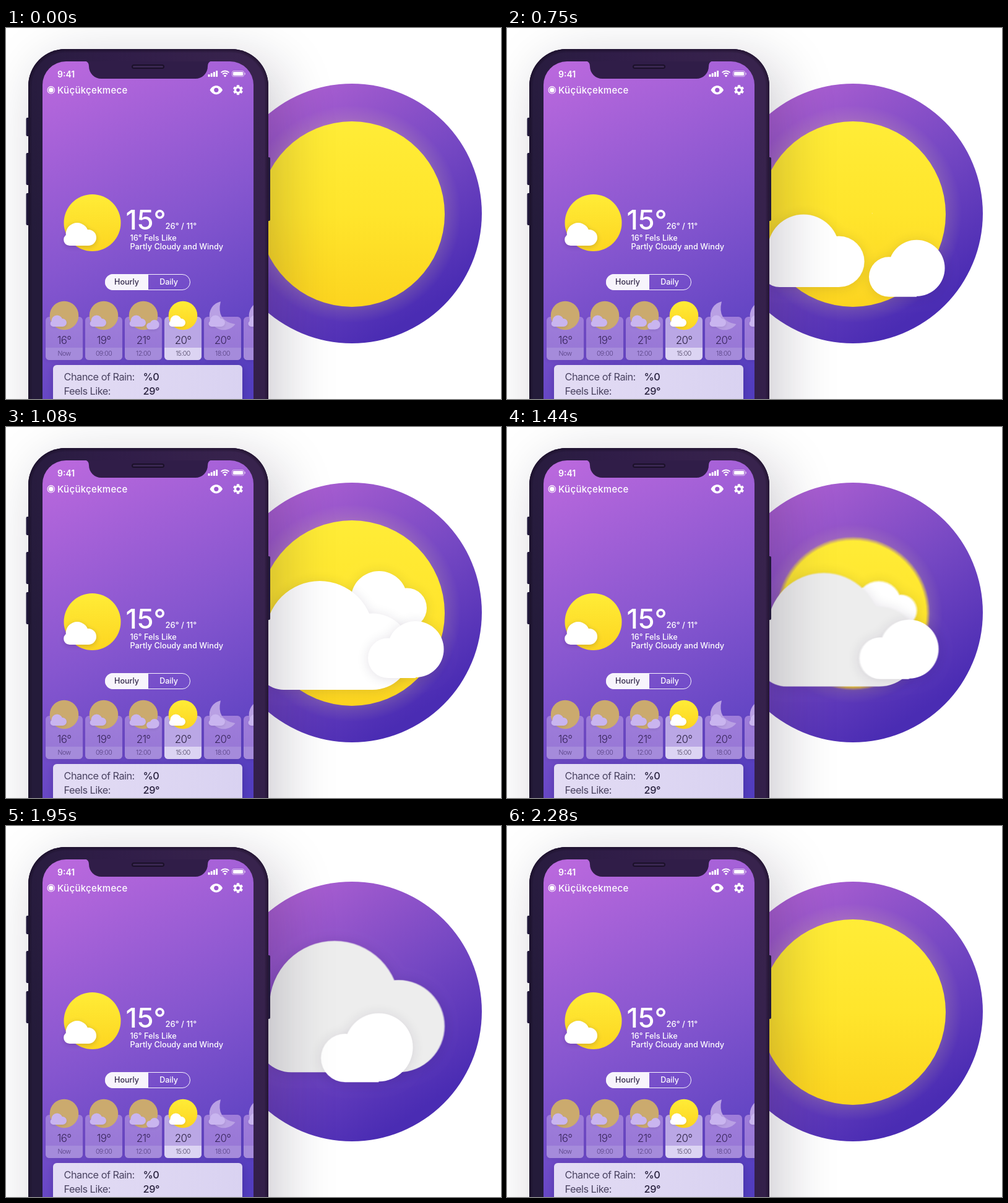
Write an HTML page with a canvas that moves like this. It is 800x600 px and loops after 2.4 s.

```html
<!DOCTYPE html>
<html lang="en">
<head>
<meta charset="utf-8">
<title>Weather transition</title>
<style>
html, body { margin: 0; width: 100%; height: 100%; overflow: hidden; background: #fff; }
canvas { display: block; }
</style>
</head>
<body>
<canvas id="stage" width="800" height="600"></canvas>
<script>
const W = 800, H = 600, LOOP = 2400, STEP = 30, TAU = Math.PI * 2;
const stage = document.getElementById('stage').getContext('2d');
const layer = newLayer(), phone = newLayer();

function newLayer() {
  const c = document.createElement('canvas');
  c.width = W;
  c.height = H;
  return c.getContext('2d');
}

function gradient(c, x0, y0, x1, y1, ...colors) {
  const g = c.createLinearGradient(x0, y0, x1, y1);
  colors.forEach((col, i) => g.addColorStop(i / (colors.length - 1), col));
  return g;
}

function disc(c, x, y, r, fill) {
  c.beginPath();
  c.arc(x, y, r, 0, TAU);
  c.fillStyle = fill;
  c.fill();
}

function box(c, x, y, w, h, r, fill) {
  c.beginPath();
  c.roundRect(x, y, w, h, r);
  c.fillStyle = fill;
  c.fill();
}

function shadow(c, color, blur, dx, dy) {
  c.shadowColor = color;
  c.shadowBlur = blur;
  c.shadowOffsetX = dx;
  c.shadowOffsetY = dy;
}

// x, y: top of the main lobe; h: height; side: 1 puts the small lobe right
function cloud(c, x, y, h, fill, { side = 1, tail = true, shade = 0.12, blur = 20 } = {}) {
  if (h < 0.5) return;
  const lobe = (cx, cy, r) => {
    c.moveTo(cx + r, cy);
    c.arc(cx, cy, r, 0, TAU);
  };
  c.save();
  c.translate(x, y);
  c.scale(h * side, h);
  c.beginPath();
  lobe(0, 0.495, 0.495);
  lobe(0.486, 0.649, 0.351);
  if (tail) lobe(-0.33, 0.74, 0.26);
  const left = tail ? -0.33 : 0;
  c.rect(left, 0.7, 0.486 - left, 0.3);
  shadow(c, `rgba(30,10,60,${shade})`, blur, 0, 2);
  c.fillStyle = fill;
  c.fill();
  c.restore();
}

// ---- animated badge ----

// clouds: [x, top, height], sun: [x, y, radius]
const SUN = [559, 301, 150];
const clear = { sun: SUN, big: [424, 376.5, 0], front: [632, 402, 0], back: [590, 300, 0] };
const partly = { sun: SUN, big: [479, 302, 117], front: [662, 343, 92], back: [590, 300, 0] };
const mostly = { sun: SUN, big: [507, 249, 176], front: [662, 314, 92], back: [603, 233, 92] };
const overcast = { sun: [562, 304, 6], big: [532, 184, 214.5], front: [602, 301.5, 113], back: [592, 314, 0] };

const moves = [
  { at: 300, dur: 180, from: clear, to: partly },
  { at: 720, dur: 360, from: partly, to: mostly },
  { at: 1320, dur: 360, from: mostly, to: overcast },
  { at: 1920, dur: 360, from: overcast, to: clear }
];

const clamp = v => Math.max(0, Math.min(1, v));
const ease = p => p < 0.5 ? 2 * p * p : 1 - 2 * (1 - p) * (1 - p);
const mix = (a, b, e) => a.map((v, i) => v + (b[i] - v) * e);

function pose(t) {
  const m = moves.filter(v => v.at <= t).pop() || moves[0];
  const e = ease(clamp((t - m.at) / m.dur));
  const fast = m.to === clear ? Math.min(1, e / 0.75) : e;
  let grey = 0;
  if (m.to === overcast) grey = Math.min(1, e * 5);
  if (m.from === overcast) grey = 1;
  return {
    sun: mix(m.from.sun, m.to.sun, e),
    big: mix(m.from.big, m.to.big, e),
    front: mix(m.from.front, m.to.front, fast),
    back: mix(m.from.back, m.to.back, e),
    tone: Math.round(255 - 18 * grey)
  };
}

function drawBadge(c, t) {
  const { sun: [x, y, r], big, front, back, tone } = pose(t);
  c.fillStyle = '#fff';
  c.fillRect(0, 0, W, H);
  c.save();
  disc(c, 559, 300, 210, gradient(c, 455, 125, 675, 455, '#a75dd0', '#7648c3', '#4a2cb3'));
  c.clip();

  const glow = c.createRadialGradient(x, y, r * 0.9, x, y, r + 26);
  glow.addColorStop(0, 'rgba(255,235,120,.26)');
  glow.addColorStop(0.5, 'rgba(255,235,140,.1)');
  glow.addColorStop(1, 'rgba(255,235,150,0)');
  disc(c, x, y, r + 26, glow);
  disc(c, x, y, r, gradient(c, 0, y - r, 0, y + r, '#ffec37', '#ffe52c', '#fcd41f'));

  cloud(c, ...back, '#fff', { tail: false });
  cloud(c, ...big, `rgb(${tone},${tone},${tone})`);
  cloud(c, ...front, '#fff', { side: -1, tail: false });
  c.restore();
}

// ---- phone ----

function text(c, str, x, y, size, weight, fill, { align = 'left', gap = 0 } = {}) {
  c.font = `${weight} ${size}px Inter, "Open Sans", sans-serif`;
  c.letterSpacing = gap + 'px';
  c.textAlign = align;
  c.fillStyle = fill;
  c.fillText(str, x, y);
}

function drawBody(c) {
  c.save();
  shadow(c, 'rgba(25,15,40,.22)', 90, 18, 22);
  box(c, 36, 34, 388, 700, 60, '#2a1b40');
  c.restore();
  for (const [x, y, h] of [[32.5, 145, 30], [32.5, 202, 52], [32.5, 267, 52], [421, 209, 103]])
    box(c, x, y, 6, h, 2, '#21183a');
  box(c, 36, 34, 388, 700, 60, gradient(c, 36, 300, 424, 200, '#241b3a', '#301d48', '#38234d'));
  // soft dark rim
  c.save();
  c.clip();
  c.strokeStyle = 'rgba(20,13,34,.2)';
  for (const w of [3, 7, 11]) {
    c.lineWidth = w;
    c.beginPath();
    c.roundRect(36, 34, 388, 700, 60);
    c.stroke();
  }
  c.restore();
}

function drawStatus(c) {
  c.beginPath();
  c.moveTo(126, 53);
  c.quadraticCurveTo(134, 54, 134, 62);
  c.arcTo(134, 82, 154, 82, 20);
  c.arcTo(326, 82, 326, 62, 20);
  c.lineTo(326, 62);
  c.quadraticCurveTo(326, 54, 334, 53);
  c.fillStyle = '#301d48';
  c.fill();
  box(c, 203, 59, 53, 7, 3.5, '#1b1029');
  box(c, 205, 61, 49, 3, 1.5, '#3a2751');

  text(c, '9:41', 83, 79.5, 14, 600, '#fff');
  for (let i = 0; i < 4; i++) {
    const h = 4 + i * 2;
    box(c, 326.5 + i * 4.2, 79 - h, 3, h, 0.8, '#fff');
  }
  c.strokeStyle = '#fff';
  c.lineWidth = 2;
  for (const r of [5.4, 9]) {
    c.beginPath();
    c.arc(354, 78.5, r, -Math.PI * 0.75, -Math.PI * 0.25);
    c.stroke();
  }
  c.beginPath();
  c.moveTo(354, 79.5);
  c.arc(354, 79.5, 3.4, -Math.PI * 0.75, -Math.PI * 0.25);
  c.fillStyle = '#fff';
  c.fill();
  c.lineWidth = 1;
  c.strokeStyle = 'rgba(255,255,255,.6)';
  c.beginPath();
  c.roundRect(365.5, 69.5, 19, 9, 2.5);
  c.stroke();
  box(c, 367, 71, 16, 6, 1.3, '#fff');
  box(c, 385.6, 72.3, 1.4, 3.5, 0.7, 'rgba(255,255,255,.6)');
}

function drawHeader(c) {
  disc(c, 72.8, 100.3, 3.9, '#fff');
  c.lineWidth = 1.1;
  c.strokeStyle = '#fff';
  c.beginPath();
  c.arc(72.8, 100.3, 5.7, 0, TAU);
  c.stroke();
  text(c, 'Küçükçekmece', 83, 106, 15, 500, '#fff', { gap: 0.3 });

  c.beginPath();
  c.moveTo(329.5, 100.3);
  c.bezierCurveTo(334, 90.8, 345.5, 90.8, 350, 100.3);
  c.bezierCurveTo(345.5, 109.8, 334, 109.8, 329.5, 100.3);
  c.fillStyle = '#fff';
  c.fill();
  disc(c, 339.8, 100.3, 3.6, '#9b56cf');

  c.save();
  c.translate(375, 100.3);
  for (let i = 0; i < 6; i++) {
    box(c, -2.2, -8, 4.4, 6, 1, '#fff');
    c.rotate(TAU / 6);
  }
  disc(c, 0, 0, 6, '#fff');
  disc(c, 0, 0, 2.8, '#9052cb');
  c.restore();
}

function drawNow(c) {
  disc(c, 139.5, 315, 46, gradient(c, 0, 269, 0, 361, '#ffec37', '#fdd520'));
  cloud(c, 115, 315, 37, '#fff', { shade: 0.2, blur: 8 });
  text(c, '15°', 193.5, 326, 44, 500, '#fff', { gap: 0.2 });
  text(c, '26° / 11°', 257.5, 325, 13, 500, '#fff');
  text(c, '16° Fels Like', 200.5, 344, 12.75, 500, '#fff');
  text(c, 'Partly Cloudy and Windy', 200.5, 358, 12.75, 500, '#fff');

  box(c, 160, 398, 70, 26, [13, 0, 0, 13], '#f7f4fc');
  c.lineWidth = 1;
  c.strokeStyle = '#f7f4fc';
  c.beginPath();
  c.roundRect(160.5, 398.5, 137, 25, 12.5);
  c.stroke();
  text(c, 'Hourly', 195, 415, 12.5, 500, '#33294a', { align: 'center' });
  text(c, 'Daily', 263, 415, 12.5, 500, '#fff', { align: 'center' });
}

function moon(c, x) {
  c.beginPath();
  c.moveTo(x - 3, 442);
  c.arc(x + 2, 465, 23.3, -1.78, 0.65, true);
  c.quadraticCurveTo(x - 11, 474, x - 3, 442);
  c.fillStyle = '#b9a0e4';
  c.fill();
}

function drawHours(c) {
  const hours = [['16°', 'Now'], ['19°', '09:00'], ['21°', '12:00'], ['20°', '15:00'], ['20°', '18:00'], ['', '']];
  hours.forEach(([temp, label], i) => {
    const x = 64 + i * 64, mid = x + 30, active = i === 3;
    c.save();
    shadow(c, 'rgba(40,15,90,.12)', 6, 0, 2);
    box(c, x, 467, 60, 70, 6, active ? '#baa7e5' : gradient(c, 0, 467, 0, 537, '#9f7dda', '#9676d5'));
    c.restore();
    box(c, x, 517, 60, 20, [0, 0, 6, 6], active ? '#dcd4f3' : '#a58bdb');
    if (i < 4) {
      const sun = active ? gradient(c, 0, 442, 0, 488, '#ffec37', '#fdd520') : '#cbaa6e';
      disc(c, mid, 465, 23.3, sun);
    } else {
      moon(c, mid);
    }
    const tint = active ? '#fff' : '#c9b5ef';
    cloud(c, mid - 11.5, 464.5, 18.5, tint, { shade: 0.1, blur: 4 });
    if (i === 2) cloud(c, mid + 18, 472, 15.5, tint, { side: -1, tail: false, shade: 0.1, blur: 4 });
    const ink = active ? '#2b2142' : '#37245a';
    text(c, temp, mid, 511, 17, 300, ink, { align: 'center', gap: -0.8 });
    text(c, label, mid, 530, 10.5, 300, active ? '#4a4060' : '#553f80', { align: 'center', gap: -0.5 });
  });
}

function drawDetails(c) {
  c.save();
  shadow(c, 'rgba(35,15,90,.3)', 12, 0, 2);
  box(c, 76, 545, 306, 80, 6, gradient(c, 76, 545, 382, 600, '#e3dcf4', '#d9d2f1'));
  c.restore();
  [['Chance of Rain:', '%0', 570], ['Feels Like:', '29°', 593]].forEach(([name, value, y]) => {
    text(c, name, 93.5, y, 16.3, 400, '#4a4361', { gap: -0.5 });
    text(c, value, 221.5, y, 16.3, 500, '#2a2340', { gap: -0.4 });
  });
}

function drawPhone(c) {
  drawBody(c);
  c.save();
  box(c, 59, 54, 341, 700, 38, gradient(c, 95, 60, 345, 600, '#b968dd', '#8656cf', '#523dbe'));
  c.clip();
  drawStatus(c);
  drawHeader(c);
  drawNow(c);
  drawHours(c);
  drawDetails(c);
  c.restore();
}

// ---- playback ----

// while moving, averages a few poses over the open shutter
function render(t) {
  const moving = moves.some(m => t > m.at && t < m.at + m.dur);
  const shots = moving ? 7 : 1, shutter = 12;
  for (let i = 0; i < shots; i++) {
    drawBadge(layer, t - (moving ? shutter * i / (shots - 1) : 0));
    stage.globalAlpha = 1 / (i + 1);
    stage.drawImage(layer.canvas, 0, 0);
  }
  stage.globalAlpha = 1;
  stage.drawImage(phone.canvas, 0, 0);
}

let start = null, shown = -1;
function tick(now) {
  if (start === null) start = now;
  const t = Math.floor(((now - start) % LOOP) / STEP) * STEP;
  if (t !== shown) render(shown = t);
  requestAnimationFrame(tick);
}

drawPhone(phone);
render(0);
requestAnimationFrame(tick);
</script>
</body>
</html>
```
